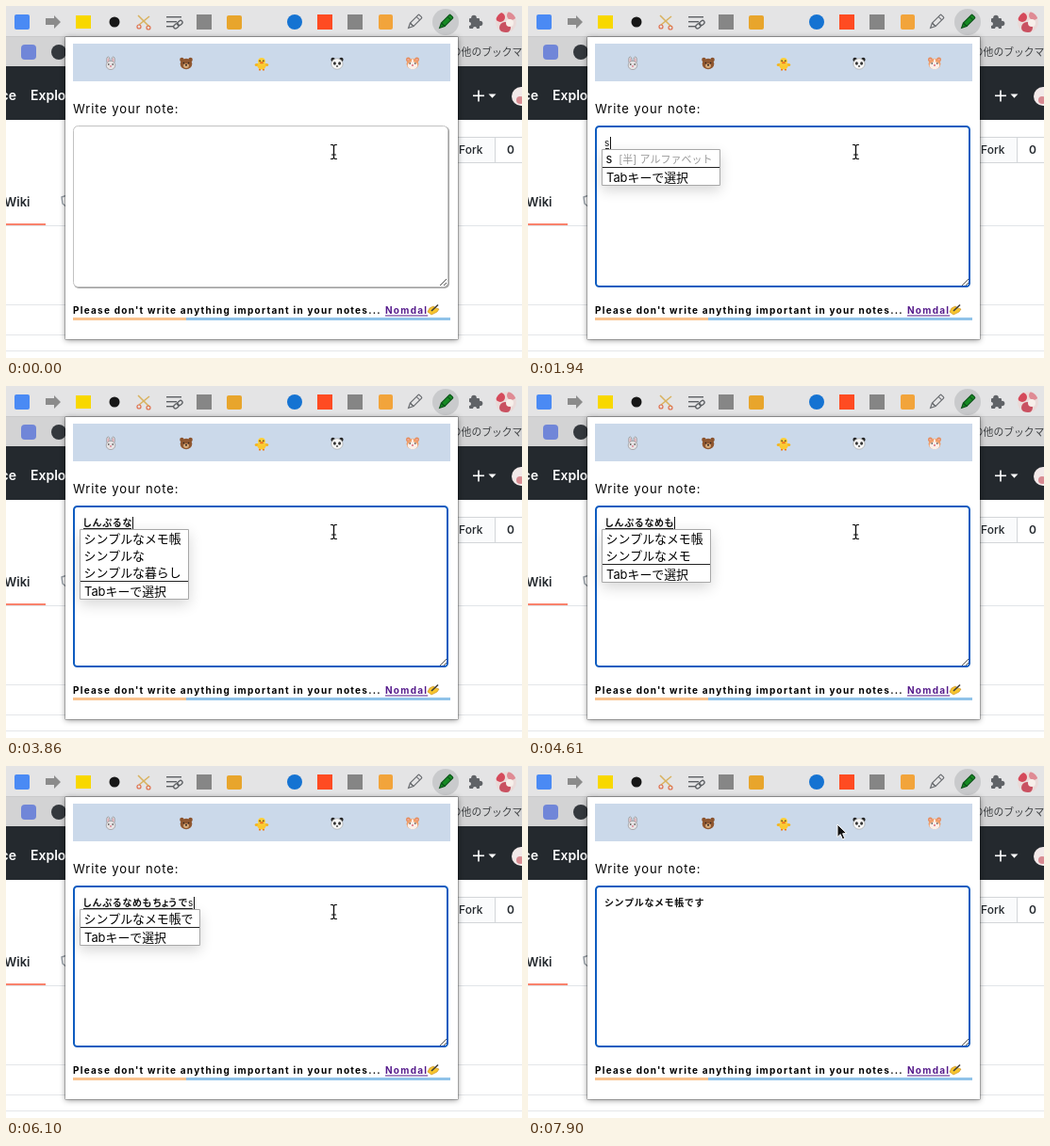
An HTML page with a canvas for the animation above (8 s loop, 547 px wide and 374 px high).

```html
<!DOCTYPE html>
<html lang="ja">
<head>
<meta charset="utf-8">
<title>Note popup</title>
<style>
html, body { margin: 0; width: 100%; height: 100%; overflow: hidden; background: #fff; }
canvas { display: block; width: 547px; height: 374px; }
</style>
</head>
<body>
<canvas id="stage"></canvas>
<script>
const W = 547, H = 374, LOOP = 8000;
const canvas = document.getElementById('stage');
const ctx = canvas.getContext('2d');
const dpr = window.devicePixelRatio || 1;
canvas.width = W * dpr;
canvas.height = H * dpr;

const LATIN = 'Inter, "Noto Sans", sans-serif';
const CJK = 'Inter, "Noto Sans CJK JP", "Noto Sans CJK", sans-serif';

function rect(x, y, w, h, fill) {
  ctx.fillStyle = fill;
  ctx.fillRect(x, y, w, h);
}
function box(x, y, w, h, r, fill, stroke, lw = 1) {
  ctx.beginPath();
  ctx.roundRect(x, y, w, h, r);
  paint(fill, stroke, lw);
}
function oval(x, y, rx, ry, fill, stroke, lw = 1) {
  ctx.beginPath();
  ctx.ellipse(x, y, rx, ry, 0, 0, 7);
  paint(fill, stroke, lw);
}
const dot = (x, y, r, fill, stroke, lw) => oval(x, y, r, r, fill, stroke, lw);
function poly(pts, fill, stroke, lw = 1, close = true) {
  ctx.beginPath();
  for (let i = 0; i < pts.length; i += 2) ctx.lineTo(pts[i], pts[i + 1]);
  if (close) ctx.closePath();
  paint(fill, stroke, lw);
}
const line = (pts, stroke, lw) => poly(pts, null, stroke, lw, false);
function paint(fill, stroke, lw) {
  if (fill) { ctx.fillStyle = fill; ctx.fill(); }
  if (stroke) { ctx.strokeStyle = stroke; ctx.lineWidth = lw; ctx.stroke(); }
}
function text(s, x, y, font, fill, spacing = 0) {
  ctx.font = font;
  ctx.letterSpacing = spacing + 'px';
  ctx.fillStyle = fill;
  ctx.fillText(s, x, y);
  const w = ctx.measureText(s).width;
  ctx.letterSpacing = '0px';
  return w;
}
function shadow(color, blur, y, draw) {
  ctx.save();
  ctx.shadowColor = color;
  ctx.shadowBlur = blur * dpr;
  ctx.shadowOffsetY = y * dpr;
  draw();
  ctx.restore();
}
function at(x, y, angle, draw) {
  ctx.save();
  ctx.translate(x, y);
  ctx.rotate(angle);
  draw();
  ctx.restore();
}

// ---- browser ----
function pen(x, fill, stroke) {
  at(x, 17, Math.PI / 4, () => {
    box(-2.5, -9, 5, 13, 1, fill, stroke, 1.2);
    poly([-2.5, 4, 2.5, 4, 0, 9], fill, stroke, 1.2);
    line([-2.5, -5.5, 2.5, -5.5], stroke, 1);
  });
}

function toolbar() {
  rect(0, 0, W, 33, '#e4e4e5');
  rect(0, 33, W, 31, '#d3d3d4');
  rect(0, 32, W, 1, '#cacacb');

  box(9, 9, 16, 16, 2, '#4a8af4');
  poly([42, 13, 51, 13, 51, 10, 58, 17, 51, 24, 51, 20, 42, 20], '#8b8b8b');
  rect(74, 10, 16, 14, '#f8d800');
  dot(115, 17, 5.5, '#161616');
  line([140, 10, 152, 22], '#d9b25f', 1.6);
  line([152, 11, 141, 20], '#d9b25f', 1.6);
  dot(141, 22, 2, null, '#e0704f', 1.2);
  dot(151, 23, 2, null, '#e0704f', 1.2);
  for (let i = 0; i < 3; i++) rect(170, 11 + i * 5, [16, 11, 7][i], 1.4, '#5c5f63');
  at(182, 20, -0.7, () => {
    box(-5, -2, 6, 4, 2, null, '#5c5f63', 1.3);
    box(0, -2, 6, 4, 2, null, '#5c5f63', 1.3);
  });
  rect(202, 9, 16, 16, '#868686');
  box(234, 10, 16, 15, 2, '#e8a52c');
  dot(306, 17, 8, '#1573d2');
  rect(330, 9, 16, 16, '#ff4b22');
  rect(362, 9, 16, 16, '#858585');
  box(395, 9, 15, 16, 2, '#f2a43b');
  pen(433, null, '#696c70');
  dot(466, 17, 14, '#c9cacc');
  pen(466, '#168a23', '#0c531a');

  box(491, 13, 11, 11, 1, '#606367');
  dot(496, 12.5, 2.8, '#606367');
  dot(502.5, 18.5, 2.8, '#606367');
  dot(491, 19, 2, '#e4e4e5');
  dot(497, 24, 2, '#e4e4e5');

  ctx.save();
  dot(530, 17, 11, '#eadbd9');
  ctx.clip();
  dot(524, 12, 5, '#d54a5b');
  dot(536, 10, 5, '#df8b94');
  dot(529, 23, 6, '#c95161');
  dot(534, 18, 4, '#f7efea');
  ctx.restore();

  box(16, 41, 16, 16, 4, '#7086d8');
  dot(56, 49, 8, '#34383d');
  text('その他のブックマーク', 461, 52.5, '10.8px ' + CJK, '#3e4043');
}

function page() {
  rect(0, 64, W, 57, '#24292e');
  text('ce', -5.5, 100, '600 14px ' + LATIN, '#fff');
  text('Explore', 26, 100, '600 14px ' + LATIN, '#fff');
  rect(495, 94.5, 12, 1.6, '#fff');
  rect(500.2, 89.5, 1.6, 12, '#fff');
  poly([511.5, 93.5, 519.5, 93.5, 515.5, 97.8], '#fff');
  dot(546, 96, 10, '#f2e9e9');
  dot(545, 100, 4, '#d88b92');

  box(440.5, 139.5, 120, 27, 4, '#fafbfc', '#d3d6d9');
  rect(518, 140, 40, 26, '#fff');
  rect(518, 140, 1, 26, '#d3d6d9');
  text('Fork', 480, 157, '500 12px ' + LATIN, '#24292e');
  text('0', 531, 157, '600 12px ' + LATIN, '#24292e');

  rect(0, 233, W, 1, '#e1e4e8');
  text('Wiki', -2, 213, '600 13px ' + LATIN, '#24292e');
  rect(0, 231, 42, 2, '#f9826c');
  poly([59, 203, 65, 201, 71, 203, 70, 210, 65, 214, 60, 210], null, '#959da5', 1.4);
  for (const y of [317, 349, 366]) rect(0, y, W, 1, '#e4e6e9');
}

// ---- note panel ----
function eyes(x, y, gap = 2.2) {
  dot(x - gap, y, 0.8, '#2b2320');
  dot(x + gap, y, 0.8, '#2b2320');
}

function animals() {
  const y = 61;
  for (const s of [-1, 1]) {
    oval(111 + s * 2.7, y - 3.5, 1.7, 3.6, '#dedbdd', '#8f8b8d', 0.7);
    oval(111 + s * 2.7, y - 3.3, 0.7, 2.3, '#eaa9b4');
    dot(191 + s * 4.6, y - 4, 2.2, '#8a532d');
    oval(271 + s * 5, y + 1.5, 2.4, 1.5, '#f3b51f');
    dot(351 + s * 4.4, y - 4, 2.2, '#242424');
    dot(431 + s * 4.6, y - 4, 2.4, '#e58a57');
    dot(431 + s * 4.6, y - 4, 1.1, '#f3adb0');
  }
  oval(111, y + 2, 4.8, 4.6, '#e6e4e5', '#979395', 0.7);
  eyes(111, y + 1);
  dot(111, y + 3, 0.9, '#e07f92');

  oval(191, y + 0.5, 6.3, 5.8, '#8f5730');
  oval(191, y + 2.6, 2.9, 2.4, '#d6ab7c');
  eyes(191, y - 0.5, 2.6);
  dot(191, y + 1.8, 1, '#2b2320');

  oval(271, y + 2.5, 4.6, 4, '#fbc92f');
  dot(271, y - 2, 3.9, '#fcd03a');
  eyes(271, y - 2.8, 1.9);
  oval(271, y - 0.8, 2.2, 1.2, '#ef7d22');
  for (const x of [268, 272]) rect(x, y + 6, 2, 1.5, '#ef7d22');

  oval(351, y + 0.5, 6.1, 5.7, '#f6f6f6', '#9d9d9d', 0.6);
  for (const s of [-1, 1]) oval(351 + s * 2.6, y, 1.5, 1.8, '#333');
  oval(351, y + 3, 1.2, 0.8, '#242424');

  oval(431, y + 0.5, 6.4, 5.8, '#ee9f6c');
  oval(431, y + 2.2, 5.2, 4, '#fbefe7');
  rect(430, y - 4.5, 2, 5, '#fbefe7');
  eyes(431, y, 2.8);
  dot(431, y + 2, 1, '#e06a80');
}

function panel() {
  shadow('rgba(0,0,0,.45)', 6, 1, () => rect(63, 33, 416, 321, '#fff'));
  box(62.5, 32.5, 417, 322, 1, null, 'rgba(0,0,0,.22)');
  rect(71, 40, 400, 40, '#cbd9ea');
  animals();
  text('Write your note:', 71, 114, '13px ' + LATIN, '#000', 0.9);

  const bold = '700 10px ' + LATIN;
  text("Please don't write anything important in your notes...", 71, 327, bold, '#000', 1.25);
  const w = text('Nomdal', 402, 327, bold, '#551a8b', 1.25);
  rect(402, 328.5, w, 1, '#551a8b');

  poly([447, 325, 449, 321, 453, 319, 456, 321, 459, 322, 457, 325, 451, 328], '#f7c52f', '#c88a18', 0.6);
  line([451, 324, 458, 317.5], '#3c3c3c', 1.6);
  rect(71, 331, 120, 3, '#f9c28d');
  rect(191, 331, 280, 3, '#90c3e9');
}

function field(focus) {
  if (focus) {
    box(72, 128, 396, 170, 3.5, '#fff', '#0f5cc0', 2);
  } else {
    box(72, 128, 398, 172, 5, '#a2a2a2');
    box(71.5, 127.5, 397, 171, 5, '#fff', '#c2c2c2');
  }
  line([460, 297, 467, 290], '#555', 1);
  line([464, 297, 467, 294], '#555', 1);
}

// ---- typing ----
const S = 'シンプル', M = 'シンプルなメモ帳', K = 'しんぷるな';
const kana = [['し', 'ひらがな']];
const heart = [['しん', 'ひらがな'], ['心']];
const wide = [[S + 'な'], [S], [S + 'イズベストな暮らし方']];
const three = [[M], [S + 'な'], [S + 'な暮らし']];
const memo = [[M], [S + 'なメモ']];
const desu = [[M], [M + 'です']];
const de = [[M + 'で']];
const full = [[M + 'です'], [M + 'ですが使いやすい']];

// time, typed text, candidates, right edge of the list
const steps = [
  [1940, 's', [['s', '[半] アルファベット']], 204],
  [2090, 'し', kana, 194],
  [2380, 'しn', kana, 194],
  [2830, 'しん', heart, 194],
  [2970, 'しんp', heart, 194],
  [3420, 'しんぷ', wide, 268],
  [3560, 'しんぷる', wide, 268],
  [3860, K, three, 194],
  [4160, K + 'm', three, 194],
  [4310, K + 'め', memo, 194],
  [4460, K + 'めm', memo, 194],
  [4610, K + 'めも', memo, 194],
  [5060, K + 'めもt', memo, 194],
  [5210, K + 'めもty', memo, 194],
  [5350, K + 'めもちょ', memo, 194],
  [5500, K + 'めもちょう', desu, 219],
  [5650, K + 'めもちょうd', desu, 219],
  [5800, K + 'めもちょうで', de, 206],
  [6100, K + 'めもちょうでs', de, 206],
  [6250, K + 'めもちょうです', full, 297],
  [6400, M + 'です', null, 0]
];

// small kana sit closer to their neighbours
function typed(s) {
  let x = 81;
  for (const c of s) {
    const latin = c < '~', small = c === 'ょ';
    const font = (latin ? '400' : '700') + ' 10px ' + CJK;
    const w = text(c, x - (small ? 2 : 0), 149.2, font, '#111', 0.6);
    x += small ? w - 4.6 : w;
  }
  return x;
}

function list(rows, right) {
  const sep = 153 + 18 * rows.length, w = right - 78;
  shadow('rgba(0,0,0,.16)', 14, 5, () => rect(78, 152, w, sep - 132, '#fff'));
  box(78.5, 152.5, w - 1, sep - 133, 0, '#fff', '#a8a8a8');
  rect(79, sep, w - 2, 1, '#222');
  const font = '12.9px ' + CJK;
  rows.forEach(([word, hint], i) => {
    const y = 167 + 18 * i;
    const tw = text(word, 82.5, y, font, '#000');
    if (hint) text(hint, 82.5 + tw + 7, y - 0.5, '11px ' + CJK, '#999');
  });
  text('Tabキーで選択', 83, sep + 16, font, '#000');
}

function note(t) {
  const step = steps.findLast(s => t >= s[0]);
  if (!step) {
    if (t >= 890 && t < 1490) rect(82, 139, 1, 13, '#111');
    return;
  }
  const [, s, rows, right] = step;
  const end = typed(s);
  if (t < 7150) rect(82, rows ? 151 : 150.5, end - 83, rows ? 1 : 1.5, '#222');
  if (t < 7600) rect(Math.round(end), 139, 1, 13, '#111');
  if (rows) list(rows, right);
}

// ---- pointer ----
function ibeam(x, y) {
  ctx.lineCap = 'round';
  for (const [c, w] of [['#fff', 3], ['#111', 1.2]]) {
    line([x - 3, y - 7.5, x - 1, y - 7.5, x, y - 6, x, y + 6, x - 1, y + 7.5, x - 3, y + 7.5], c, w);
    line([x + 3, y - 7.5, x + 1, y - 7.5, x, y - 6, x, y + 6, x + 1, y + 7.5, x + 3, y + 7.5], c, w);
    line([x - 2, y + 3, x + 2, y + 3], c, w);
  }
  ctx.lineCap = 'butt';
}
function arrow(x, y) {
  at(x, y, 0, () => poly(
    [0, 0, 0, 13.5, 3.2, 10.6, 5.4, 15.8, 7.8, 14.8, 5.6, 9.8, 9.8, 9.6], '#111', '#fff', 1));
}
function pointer(t) {
  if (t < 7600) ibeam(347.5, 155);
  else if (t < 7750) ibeam(344, 138);
  else if (t < 7900) arrow(334, 88);
  else arrow(328, 62);
}

const start = performance.now();
function frame() {
  const t = (performance.now() - start) % LOOP;
  ctx.setTransform(dpr, 0, 0, dpr, 0, 0);
  rect(0, 0, W, H, '#fff');
  page();
  toolbar();
  panel();
  field(t >= 890);
  note(t);
  pointer(t);
  requestAnimationFrame(frame);
}
requestAnimationFrame(frame);
</script>
</body>
</html>
```
